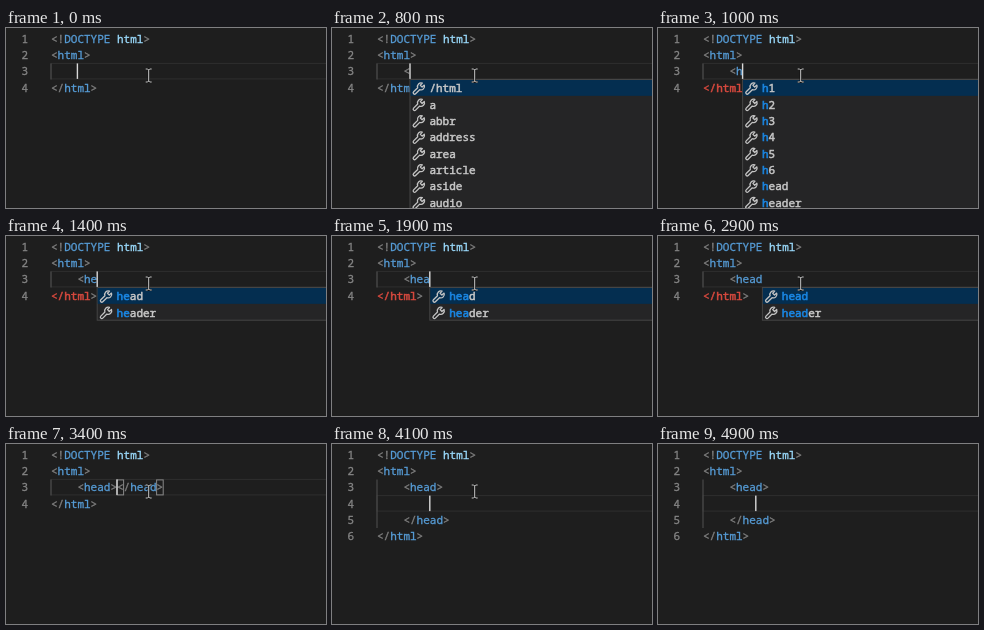
An HTML page that plays this animation: 320x180 px, repeating every 5000 ms.

```html
<!DOCTYPE html>
<html lang="en">
<head>
<meta charset="utf-8">
<title>Typing a tag</title>
<style>
  html, body { margin: 0; width: 100%; height: 100%; overflow: hidden; background: #1e1e1e; }
  svg { display: block; width: 100vw; height: 100vh; }
  text {
    font: 11px "Noto Sans Mono", "DejaVu Sans Mono", monospace;
    fill: currentColor; stroke: currentColor; stroke-width: .3;
  }
  .num { color: #858585; text-anchor: end; }
  .punct { color: #808080; }
  .tag { color: #569cd6; }
  .attr { color: #9cdcfe; }
  .bad { color: #d8493e; stroke-width: .5; }
  .item { color: #c8c8c8; stroke-width: .5; }
  .match { color: #1a86e2; stroke-width: .6; }
  .edge { fill: none; stroke: #2e2e2e; }
  .guide { stroke: #505050; }
  .bracket { fill: none; stroke: #888; }
  .wrench { fill: none; stroke: #c4c4c4; stroke-width: 1.3; stroke-linejoin: round; }
</style>
</head>
<body>
<svg id="stage" viewBox="0 0 320 180" preserveAspectRatio="none"></svg>
<script>
const LOOP = 5000, BLINK = 500;
const LEFT = 45, CHAR = 6.6, LINE = 16.2, ROW = 16.35;
const stage = document.getElementById('stage');

const ALL = ['/html', 'a', 'abbr', 'address', 'area', 'article', 'aside', 'audio'];
const HEADS = ['head', 'header'];
const H_TAGS = [1, 2, 3, 4, 5, 6].map(n => 'h' + n).concat(HEADS);

// at: start in ms, typed: text on the third line, col: caret column
const steps = [
  { at: 0, typed: '', col: 4 },
  { at: 400, typed: '<', col: 5, list: ALL },
  { at: 900, typed: '<h', col: 6, list: H_TAGS, bad: true },
  { at: 1400, typed: '<he', col: 7, list: HEADS, bad: true },
  { at: 1800, typed: '<hea', col: 8, list: HEADS, bad: true },
  { at: 2200, typed: '<head', col: 9, list: HEADS, bad: true },
  { at: 3000, typed: '<head></head>', col: 10, pair: true },
  { at: 3900, typed: '<head>', col: 8, split: true }
];
const POINTER_END = 4700;

const colX = c => LEFT + c * CHAR;
const lineY = n => 15 + (n - 1) * LINE;
const esc = s => s.replace(/&/g, '&amp;').replace(/</g, '&lt;').replace(/>/g, '&gt;');
const text = (x, y, cls, s) => `<text x="${x}" y="${y}" class="${cls}">${esc(s)}</text>`;
const rect = (x, y, w, h, attrs) =>
  `<rect x="${x}" y="${y}" width="${w}" height="${h}" ${attrs}/>`;

// Splits markup into brackets and names, each placed on its column.
function code(line, col, src, nameClass = 'tag', openClass = 'punct') {
  let out = '';
  for (const part of src.match(/<\/?|>|[^<>]+/g) || []) {
    const cls = part === '>' ? 'punct' : part[0] === '<' ? openClass : nameClass;
    out += text(colX(col), lineY(line), cls, part);
    col += part.length;
  }
  return out;
}

function wrench(x, y) {
  return `<path class="wrench" transform="translate(${x} ${y})"
    d="M9.6 1.2 A3.6 3.6 0 0 0 5 5.8 L.9 9.9 A1.4 1.4 0 0 0 2.9 11.9 L7 7.8
       A3.6 3.6 0 0 0 11.6 3.2 L9.4 5.2 L7.6 3.4 Z"/>`;
}

function popup(step) {
  const x = colX(step.col), top = 51.5, hit = step.typed.length - 1;
  let out = rect(x, top, 330, step.list.length * ROW, 'fill="#252526" stroke="#454545"');
  out += rect(x + .5, top + .5, 330, ROW - .5, 'fill="#042e50"');
  step.list.forEach((name, i) => {
    const y = top + i * ROW, tx = x + 19.4;
    out += wrench(x + 2.7, y + 2.4);
    out += text(tx, y + 12.7, 'match', name.slice(0, hit));
    out += text(tx + hit * CHAR, y + 12.7, 'item', name.slice(hit));
  });
  return out;
}

function pointer(x, y) {
  const d = `M${x - 3} ${y - 6} h2 l1 1 l1 -1 h2 M${x} ${y - 5} v11 M${x - 3} ${y + 7} h2 l1 -1 l1 1 h2`;
  return `<path d="${d}" fill="none" stroke="#111" stroke-width="2.2"/>` +
         `<path d="${d}" fill="none" stroke="#ccc"/>`;
}

function draw(step, caretOn, pointerOn) {
  const current = step.split ? 4 : 3, last = step.split ? 6 : 4;
  const top = lineY(current) - 12;
  let out = rect(0, 0, 320, 180, 'fill="#1e1e1e"');
  out += rect(LEFT, top, 300, 15.5, 'class="edge"');
  out += `<path class="guide" d="M45 35.5 V${step.split ? 84 : 51.5}"/>`;

  for (let n = 1; n <= last; n++) out += text(22, lineY(n), 'num', String(n));

  out += text(colX(0), lineY(1), 'punct', '<!') + text(colX(2), lineY(1), 'tag', 'DOCTYPE');
  out += code(1, 10, 'html>', 'attr');
  out += code(2, 0, '<html>');
  out += code(3, 4, step.typed);
  if (step.split) out += code(5, 4, '</head>');
  const end = step.bad ? 'bad' : 'tag';
  out += code(last, 0, '</html>', end, step.bad ? 'bad' : 'punct');

  if (step.pair) {
    for (const c of [10, 16]) out += rect(colX(c), top + .5, CHAR, 15, 'class="bracket"');
  }
  if (caretOn) out += rect(colX(step.col) - .7, top, 1.4, 15.5, 'fill="#d8d8d8"');
  if (step.list) out += popup(step);
  if (pointerOn) out += pointer(142.7, 47);
  stage.innerHTML = out;
}

let shown = '';
function tick() {
  const t = performance.now() % LOOP;
  const i = steps.findLastIndex(s => s.at <= t);
  const caretOn = Math.floor((t - steps[i].at) / BLINK) % 2 === 0;
  const pointerOn = t < POINTER_END;
  const key = [i, caretOn, pointerOn].join();
  if (key !== shown) {
    draw(steps[i], caretOn, pointerOn);
    shown = key;
  }
  requestAnimationFrame(tick);
}
tick();
</script>
</body>
</html>
```
